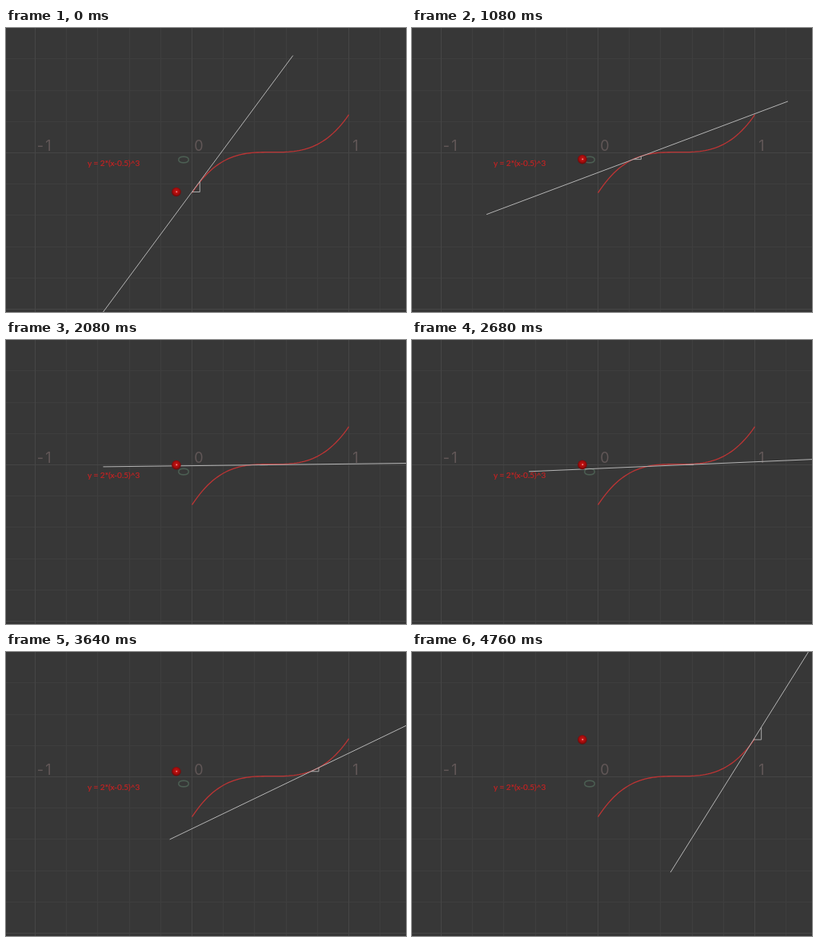
These frames come from a looping animation (500 by 356 pixels, 4800 ms). An HTML page:

```html
<!DOCTYPE html>
<html lang="en">
<head>
<meta charset="utf-8">
<title>Secant along a cubic</title>
<style>
  html, body { margin: 0; width: 100%; height: 100%; overflow: hidden; background: #373737; }
  svg { display: block; width: 500px; height: 356px; }
  path { fill: none; }
  .minor { stroke: #3e3e3e; }
  .major { stroke: #454545; }
  .curve { stroke: #bd3434; stroke-width: 1.3; }
  .secant { stroke: #b4b4b4; }
  .step { stroke: #aaa; }
  .label { font: 18px Inter, sans-serif; fill: #615757; text-anchor: middle; }
  .side { fill: #4c5f53; }
  .formula { font: 10px Lato, sans-serif; fill: #c42323; stroke: #c42323; stroke-width: .2; }
</style>
</head>
<body>
<svg viewBox="0 0 500 356">
  <path class="minor" id="minor"/>
  <path class="major" id="major"/>
  <g class="label">
    <text x="43" y="153.5">-</text>
    <text x="53" y="153.5">1</text>
    <text x="241" y="153.5">0</text>
    <text x="437" y="153.5">1</text>
    <text class="side" transform="translate(229.3 165) rotate(-90)">0</text>
  </g>
  <text class="formula" x="102" y="173.3">y = 2*(x-0.5)^3</text>
  <path class="curve" id="curve"/>
  <path class="step" id="step"/>
  <path class="secant" id="secant"/>
  <g id="ball">
    <circle r="5.8" fill="url(#shade)"/>
    <circle cx=".4" cy="-.2" r=".9" fill="#ee9a9a"/>
  </g>
  <defs>
    <radialGradient id="shade" cx=".5" cy=".45" r=".55">
      <stop offset="0" stop-color="#cf1414"/>
      <stop offset=".55" stop-color="#a90d0d"/>
      <stop offset="1" stop-color="#650808"/>
    </radialGradient>
  </defs>
</svg>
<script>
const LOOP = 4800, TICK = 40;
const UNIT = 196, OX = 232.5, OY = 156.5, DX = 0.05;
const el = id => document.getElementById(id);
const draw = (id, d) => el(id).setAttribute('d', d);
const px = x => OX + x * UNIT;
const py = y => OY - y * UNIT;
const f = x => 2 * (x - 0.5) ** 3;

function drawGrid() {
  const lines = { minor: '', major: '' };
  const snap = v => Math.floor(v) + 0.5;
  for (let i = -5; i <= 6; i++) {
    const kind = i % 5 ? 'minor' : 'major';
    lines[kind] += `M${snap(px(i / 5))} 0V356`;
    if (i < 5) lines[kind] += `M0 ${snap(py(i / 5))}H500`;
  }
  for (const kind in lines) draw(kind, lines[kind]);
}

function drawCurve() {
  const points = [];
  for (let i = 0; i <= 60; i++) {
    const x = i / 60;
    // slight bow of the plotted spline around the exact cubic
    const bow = 8 * (x - 0.5) ** 2 - 0.8;
    points.push(`${px(x).toFixed(2)} ${(py(f(x)) + bow).toFixed(2)}`);
  }
  draw('curve', 'M' + points.join('L'));
}

function pose(x) {
  const x0 = px(x), y0 = py(f(x));
  const x1 = px(x + DX), y1 = py(f(x + DX));
  const reach = UNIT / Math.hypot(x1 - x0, y1 - y0);
  const ex = (x1 - x0) * reach, ey = (y1 - y0) * reach;
  draw('step', `M${x0} ${y0}H${x1}V${y1}`);
  draw('secant', `M${x0 - ex} ${y0 - ey}L${x1 + ex} ${y1 + ey}`);
  el('ball').setAttribute('transform', `translate(${px(-0.1)} ${y0})`);
}

function frame() {
  const t = (performance.now() - start) % LOOP;
  pose(Math.floor(t / TICK) * TICK / LOOP);
  requestAnimationFrame(frame);
}

drawGrid();
drawCurve();
const start = performance.now();
frame();
</script>
</body>
</html>
```
